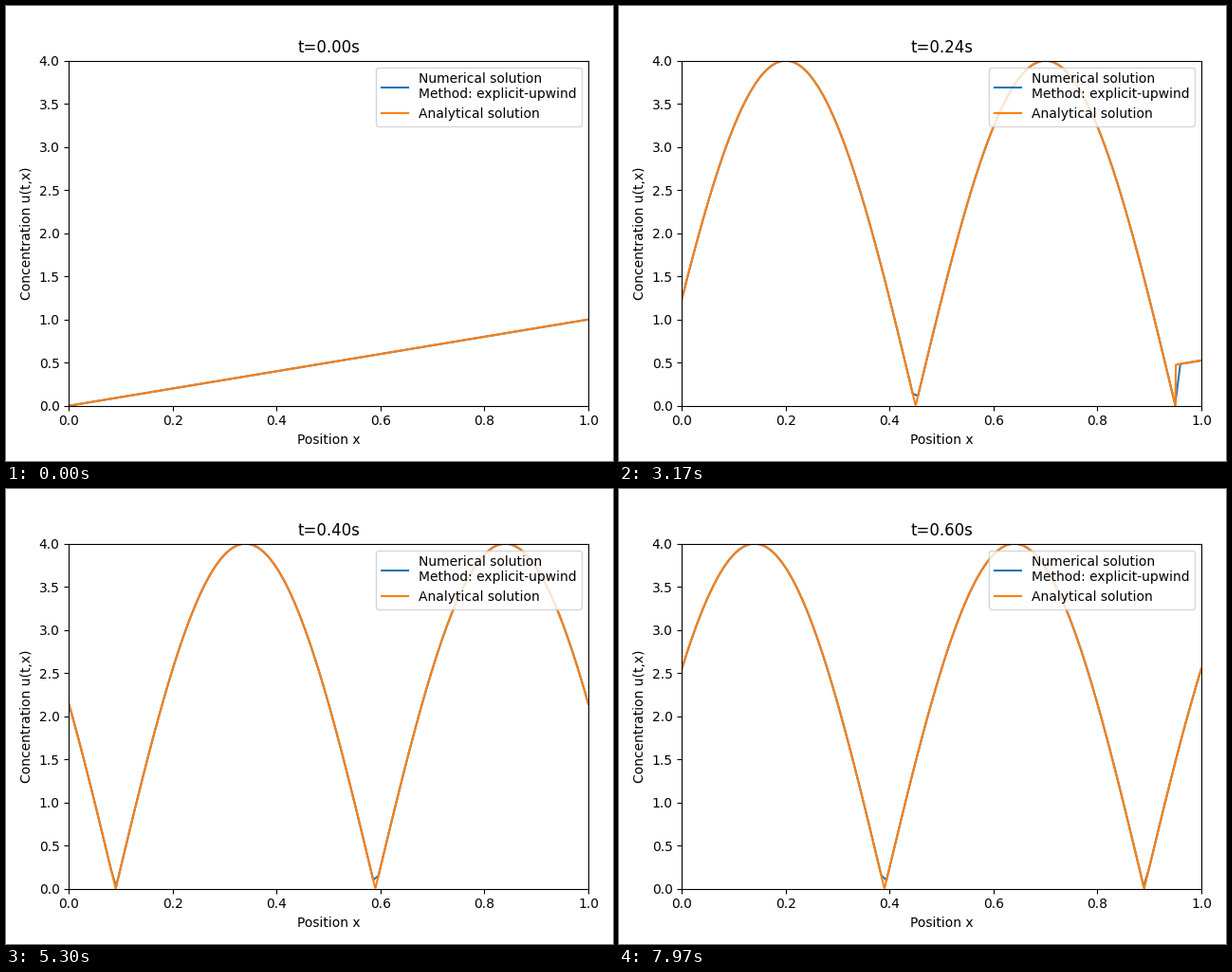
Recreate the animation shown at these times as a matplotlib script. Size 640x480 px, loop 8 s.

```python
import numpy as np
import matplotlib.pyplot as plt
from matplotlib.animation import FuncAnimation

FRAMES = 240
LOOP_MS = 8000
DT_INV = 400      # frames per unit of simulated time
SPEED = 4.0       # advection velocity
SOURCE = 2.0      # uniform growth ahead of the front


def u(t, x):
    """Inflow wave behind the front x = SPEED * t, shifted ramp ahead of it."""
    s = x - SPEED * t
    return np.where(s < 0, 4 * np.abs(np.sin(2 * np.pi * s)), s + SOURCE * t)


x_coarse = np.linspace(0, 1, 100)
x_fine = np.linspace(0, 1, 1000)

fig, ax = plt.subplots(figsize=(6.4, 4.8), dpi=100)
numeric, = ax.plot(x_coarse, u(0, x_coarse),
                   label="Numerical solution\nMethod: explicit-upwind")
exact, = ax.plot(x_fine, u(0, x_fine), label="Analytical solution")
title = ax.set_title("t=0.00s")
ax.set(xlim=(0, 1), ylim=(0, 4),
       xlabel="Position x", ylabel="Concentration u(t,x)")
ax.legend(loc="upper right")
fig.tight_layout()
fig.subplots_adjust(top=0.88)


def update(i):
    t = i / DT_INV
    numeric.set_ydata(u(t, x_coarse))
    exact.set_ydata(u(t, x_fine))
    title.set_text(f"t={t:.2f}s")
    return numeric, exact, title


anim = FuncAnimation(fig, update, frames=FRAMES, interval=LOOP_MS / FRAMES,
                     repeat=True, repeat_delay=0)
plt.show()
```
